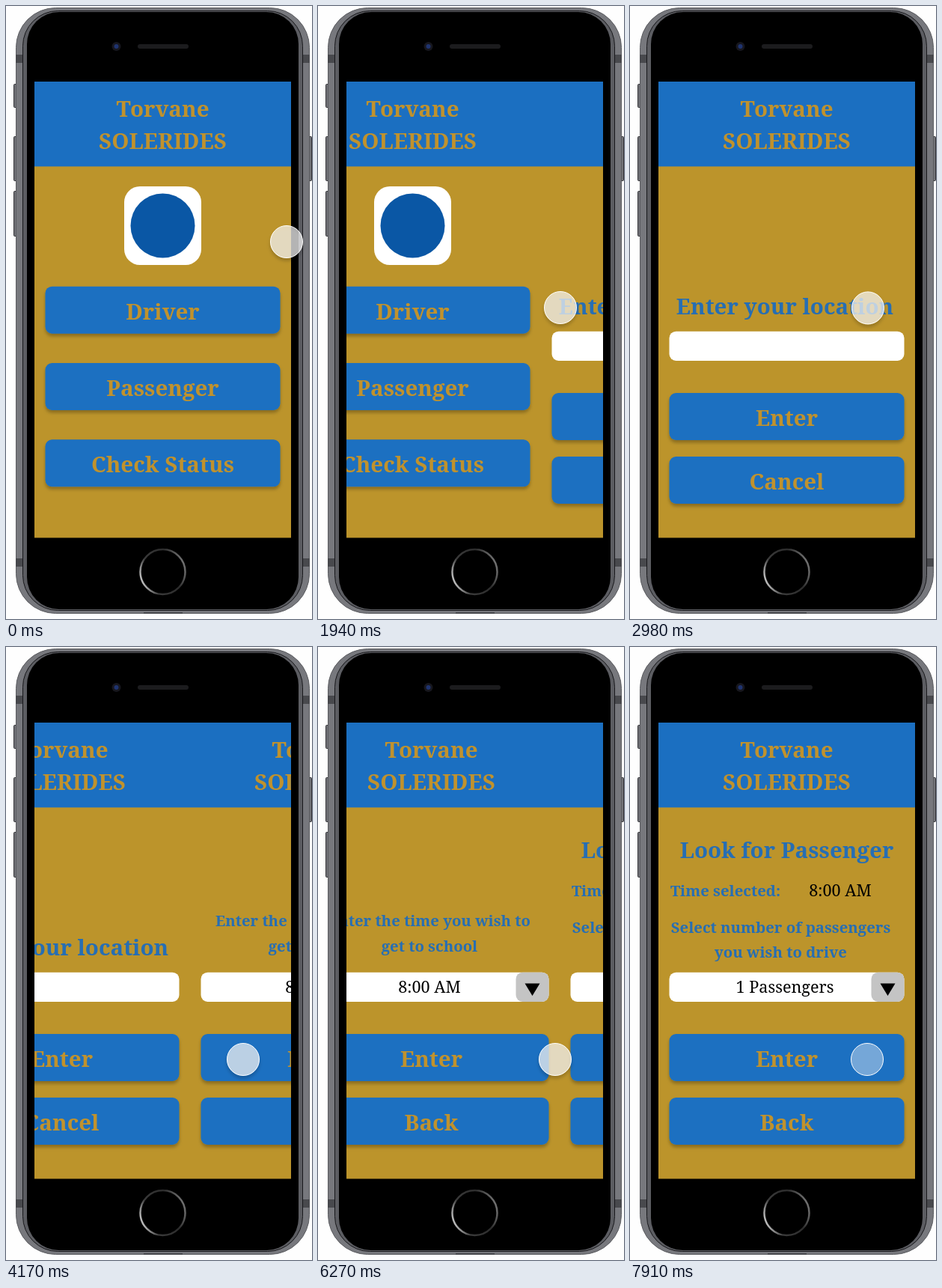
Recreate the animation shown at these times as an HTML page. Size 409 by 819 pixels, loop 8 s.

```html
<!DOCTYPE html>
<html lang="en">
<head>
<meta charset="utf-8">
<title>Ride app prototype</title>
<style>
  html, body { margin: 0; height: 100%; overflow: hidden; background: #fefefe; }
  svg { display: block; width: 409px; height: 819px; }
  text { font: 600 29.5px "Noto Serif", serif; text-anchor: middle; }
  .small { font-size: 20.3px; }
  .value { font-size: 21.6px; font-weight: 400; fill: #000; }
  .gold { fill: #c0922d; }
  .blue { fill: #266eb4; }
</style>
</head>
<body>
<svg viewBox="0 0 409 819">
  <defs>
    <clipPath id="display"><rect x="38" y="101" width="343" height="609.5"/></clipPath>
    <filter id="shadow" x="-20%" y="-20%" width="140%" height="150%">
      <feDropShadow dx="0" dy="3.5" stdDeviation="2" flood-opacity=".27"/>
    </filter>
    <linearGradient id="ring" x1="0" y1=".7" x2="1" y2=".3">
      <stop offset="0" stop-color="#ccc"/>
      <stop offset=".25" stop-color="#3a3a3a"/>
      <stop offset=".7" stop-color="#2c2c2c"/>
      <stop offset="1" stop-color="#777"/>
    </linearGradient>
  </defs>

  <g fill="#737479" stroke="#303034">
    <rect x="10.5" y="104.5" width="5" height="31" rx="1"/>
    <rect x="10.5" y="174.5" width="5" height="59" rx="1"/>
    <rect x="10.5" y="247.5" width="5" height="60" rx="1"/>
    <rect x="403.5" y="174.5" width="5" height="59" rx="1"/>
  </g>
  <rect x="13.5" y="2.5" width="392" height="809" rx="53" fill="#77787d" stroke="#5b5c60"/>
  <path d="M13 65h10v11h-10zM396 65h10v11h-10zM13 738h10v11h-10zM396 738h10v11h-10zM184 810h52v2h-52z" fill="#48494d"/>
  <rect x="22.5" y="6.5" width="374" height="801" rx="47" fill="#5c5d62" stroke="#17171a"/>
  <rect x="28" y="8" width="363" height="798" rx="43"/>
  <circle cx="147.5" cy="54" r="6" fill="#17171e"/>
  <circle cx="147.5" cy="54" r="3" fill="#1f3470"/>
  <rect x="176" y="51" width="68" height="6" rx="3" fill="#1c1c1e"/>
  <circle cx="209.5" cy="756" r="30" fill="none" stroke="url(#ring)" stroke-width="2.5"/>

  <g clip-path="url(#display)">
    <rect x="38" y="101" width="343" height="610" fill="#bc942b"/>
    <rect x="38" y="101" width="343" height="113.4" fill="#1b6fc1"/>
    <g id="pages"></g>
  </g>
  <g id="cursor">
    <circle id="dot" r="21.5" fill="#fafafa" stroke="#fff"/>
  </g>
</svg>
<script>
const PAGE_WIDTH = 343, LOOP = 8000, STEP = 149.2;
const get = id => document.getElementById(id);

const label = (text, y, style, x = 209.5) =>
  `<text class="${style}" x="${x}" y="${y}">${text}</text>`;
const button = (text, y) =>
  `<rect x="52.5" y="${y}" width="314" height="63" rx="9" fill="#1b6fc1" filter="url(#shadow)"/>` +
  label(text, y + 44, 'gold');
const field = '<rect x="52.5" y="434.7" width="314" height="39.3" rx="9" fill="#fff"/>';
const dropdown = text => field + label(text, 462, 'value', 207) +
  '<rect x="322.5" y="434.7" width="44" height="39.3" rx="9" fill="#c4c4c4"/>' +
  '<path d="M334.5 449.5h20l-10 16.5z"/>';
const actions = back => button('Enter', 517) + button(back, 602);

const pages = [
  '<rect x="158" y="241" width="103" height="105" rx="21" fill="#fff"/>' +
    '<circle cx="209.5" cy="293.5" r="43" fill="#0a57a5"/>' +
    ['Driver', 'Passenger', 'Check Status'].map((text, i) => button(text, 374.7 + i * 102.3)).join(''),
  label('Enter your location', 412, 'blue', 207) + field + actions('Cancel'),
  label('Enter the time you wish to', 373, 'blue small', 207) +
    label('get to school', 407, 'blue small', 207) +
    dropdown('8:00 AM') + actions('Back'),
  label('Look for Passenger', 282, 'blue') +
    label('Time selected:', 333, 'blue small', 127.5) + label('8:00 AM', 333, 'value', 281) +
    label('Select number of passengers', 382, 'blue small', 201.5) +
    label('you wish to drive', 415, 'blue small', 201.5) +
    dropdown('1 Passengers') + actions('Back')
];
const header = label('Torvane', 148, 'gold') + label('SOLERIDES', 191, 'gold');
get('pages').innerHTML = pages.map((page, i) =>
  `<g transform="translate(${i * PAGE_WIDTH})">${header}${page}</g>`).join('');

const progress = (time, start, end) => Math.min(1, Math.max(0, (time - start) / (end - start)));
const easeOut = p => 1 - (1 - p) ** 1.72;
const easeInOut = p => p * p * (3 - 2 * p);

// Releasing a tap pushes the next page in
const taps = [
  { down: 1490, up: 1895 },
  { down: 4025, up: 4102 },
  { down: 5965, up: 6236 },
  { down: 7905, up: LOOP }
];
const moves = [
  { start: 500, end: 1190, dx: -51, dy: 88 },
  { start: 2600, end: 2980, dx: -6, dy: 0 },
  { start: 2950, end: 4025, dx: -1, dy: 148 }
];

function draw() {
  const time = Math.floor((performance.now() % LOOP + 9) / STEP) * STEP;

  const page = taps.reduce((sum, { up }) => sum + easeOut(progress(time, up, up + 300)), 0);
  const pressed = taps.some(({ down, up }) => time >= down && time < up);
  let x = 375, y = 315;
  for (const { start, end, dx, dy } of moves) {
    const p = easeInOut(progress(time, start, end));
    x += dx * p;
    y += dy * p;
  }

  get('pages').setAttribute('transform', `translate(${-Math.round(page * PAGE_WIDTH)})`);
  get('cursor').setAttribute('transform', `translate(${x} ${y})`);
  get('cursor').setAttribute('filter', pressed ? 'none' : 'url(#shadow)');
  get('dot').setAttribute('fill-opacity', pressed ? 0.4 : 0.69);
  requestAnimationFrame(draw);
}
draw();
</script>
</body>
</html>
```
